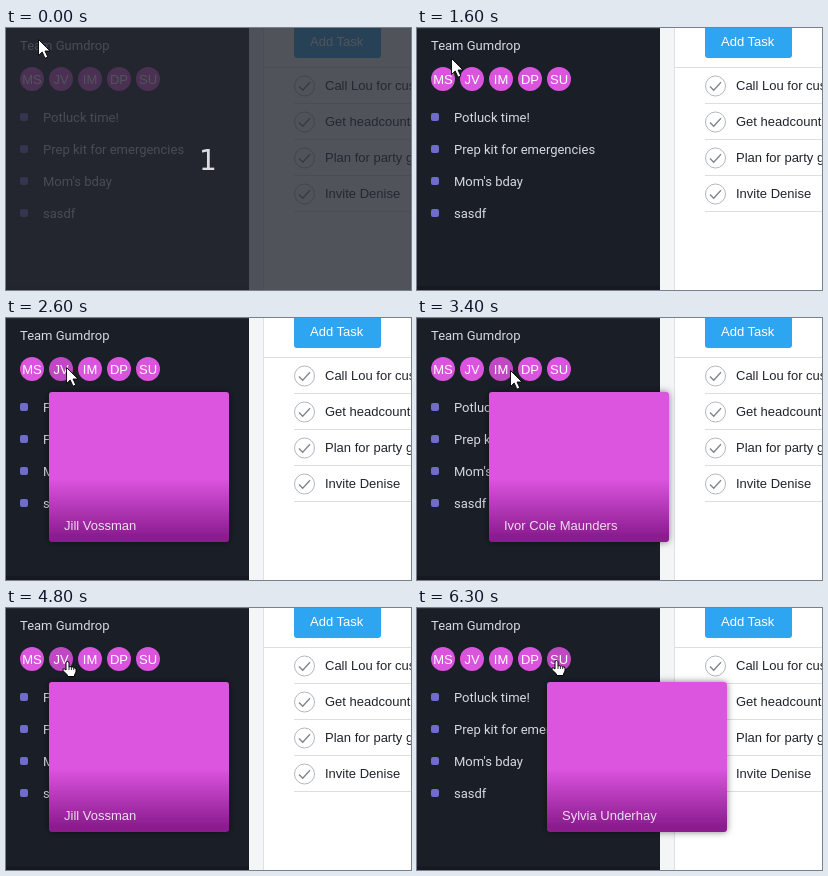
Write an HTML page that moves like this. It is 405 px wide and 262 px high and loops after 6.7 s.

```html
<!DOCTYPE html>
<html lang="en">
<head>
<meta charset="utf-8">
<title>Team avatars</title>
<style>
  html, body { margin: 0; width: 100%; height: 100%; overflow: hidden; }
  svg { display: block; width: 405px; height: 262px; cursor: default; }
  text { font: 13px "Liberation Sans", Arial, sans-serif; white-space: pre; }
  .side text { font-family: Roboto, sans-serif; fill: #d6d9dd; }
  .avatar text { fill: #fff; text-anchor: middle; }
  .tasks text { fill: #20242b; }
  .pointer { fill: #fff; stroke: #000; stroke-linejoin: round; }
</style>
</head>
<body>
<svg viewBox="0 0 405 262">
  <defs>
    <linearGradient id="shade" x1="0" y1="0" x2="0" y2="1">
      <stop offset=".58" stop-color="#db54de"/>
      <stop offset=".97" stop-color="#8a1b8e"/>
    </linearGradient>
    <filter id="shadow" x="-15%" y="-15%" width="130%" height="130%">
      <feDropShadow dx="0" dy="0" stdDeviation="3.5" flood-color="#000" flood-opacity=".5"/>
    </filter>
  </defs>

  <rect width="405" height="262" fill="#fff"/>
  <rect x="243" width="14" height="262" fill="#f4f5f6"/>
  <rect x="257" width="1" height="262" fill="#dfe2e5"/>
  <g class="tasks" id="tasks">
    <rect x="258" y="39" width="147" height="1" fill="#dcdfe2"/>
    <rect x="288" y="-10" width="87" height="40" rx="3" fill="#2ea5f0"/>
    <text x="304" y="18" style="fill:#fff">Add Task</text>
  </g>

  <rect width="243" height="262" fill="#1a1e27"/>
  <rect width="243" height="1" fill="#2b2f38"/>
  <rect y="258" width="243" height="4" fill="#171922"/>
  <g class="side" id="side"><text x="14" y="22">Team Gumdrop</text></g>
  <g id="avatars"></g>

  <g id="card">
    <rect y="74" width="180" height="150" rx="3" fill="url(#shade)" filter="url(#shadow)"/>
    <text id="cardName" x="15" y="212" fill="#f1dcf2"></text>
  </g>

  <g id="countdown">
    <rect width="405" height="262" fill="#262931" fill-opacity=".8"/>
    <text x="202" y="142" text-anchor="middle" fill="#dcdde0"
      style="font:28px 'DejaVu Sans',sans-serif">1</text>
  </g>

  <path id="arrow" class="pointer" stroke-width=".9"
    d="M.5.5V16.5L4.2 13 7 19.2 9.8 18 7 12H12Z"/>
  <g id="hand" class="pointer">
    <path d="M4 9V2Q4 .5 5.5 .5T7 2V6Q8.2 5 9.4 6.3 10.6 5.5 11.7 6.8 14 6.2 14 8.5V11L12.5 14V15.5H5.5V14L1 9.7Q.3 7.6 2.2 7.8Z"/>
    <path d="M7 6V9M9.4 6.5V9M11.7 7V9" fill="none" stroke-width=".8"/>
  </g>
</svg>
<script>
const LOOP = 6700;
const STEP = 100;
const AVATAR_GAP = 29;
const $ = id => document.getElementById(id);

function add(parent, tag, attrs, content = '') {
  const node = document.createElementNS('http://www.w3.org/2000/svg', tag);
  for (const key in attrs) node.setAttribute(key, attrs[key]);
  node.textContent = content;
  return parent.appendChild(node);
}

const members = [
  ['MS', 'Mabel Sutter'],
  ['JV', 'Jill Vossman'],
  ['IM', 'Ivor Cole Maunders'],
  ['DP', 'Delia Pockle'],
  ['SU', 'Sylvia Underhay'],
];

const circles = members.map(([initials], i) => {
  const group = add($('avatars'), 'g', { class: 'avatar' });
  const cx = 26 + i * AVATAR_GAP;
  const circle = add(group, 'circle', { cx, cy: 51, r: 12 });
  add(group, 'text', { x: cx, y: 56 }, initials);
  return circle;
});

['Potluck time!', 'Prep kit for emergencies', "Mom's bday", 'sasdf'].forEach((label, i) => {
  const y = 85 + i * 32;
  add($('side'), 'rect', { x: 14, y, width: 8, height: 8, rx: 2, fill: '#6f6ccb' });
  add($('side'), 'text', { x: 37, y: y + 9 }, label);
});

['Call Lou for customers', 'Get headcount', 'Plan for party games', 'Invite Denise'].forEach((label, i) => {
  const y = 58 + i * 36;
  const tasks = $('tasks');
  add(tasks, 'circle', { cx: 298.5, cy: y, r: 10, fill: '#fff', stroke: '#b3b8be' });
  add(tasks, 'path', { d: `M293 ${y + .5}l3.7 3.7 7.3-8`, fill: 'none', stroke: '#7d848d', 'stroke-width': 1.3 });
  add(tasks, 'text', { x: 319, y: y + 4 }, label);
  add(tasks, 'rect', { x: 288, y: y + 17, width: 117, height: 1, fill: '#dcdfe2' });
});

// Pointer poses: start time, left, top, shape, hovered member (-1 for none)
const poses = [
  [0, 32, 11, 'arrow', -1],
  [100, 9, 26, 'arrow', -1],
  [300, 5, 24, 'arrow', -1],
  [600, 1, 25, 'arrow', -1],
  [700, 10, 22, 'arrow', -1],
  [800, 25, 20, 'arrow', -1],
  [900, 37, 22, 'arrow', -1],
  [1600, 34, 30, 'arrow', -1],
  [1700, 26, 45, 'arrow', 0],
  [1800, 20, 50, 'hand', 0],
  [2200, 44, 51, 'arrow', 1],
  [2300, 46, 51, 'hand', 1],
  [2600, 60, 49, 'arrow', 1],
  [2700, 73, 50, 'arrow', 2],
  [2800, 76, 51, 'hand', 2],
  [2900, 78, 51, 'hand', 2],
  [3400, 93, 52, 'arrow', 2],
  [3500, 97, 52, 'arrow', -1],
  [3900, 100, 53, 'hand', 3],
  [4000, 104, 53, 'hand', 3],
  [4100, 101, 52, 'hand', 3],
  [4400, 109, 52, 'hand', 3],
  [4700, 82, 53, 'hand', 2],
  [4800, 56, 53, 'hand', 1],
  [4900, 100, 53, 'hand', 3],
  [5000, 127, 54, 'hand', 4],
  [5100, 131, 53, 'hand', 4],
  [5200, 133, 52, 'hand', 4],
  [5700, 139, 52, 'hand', 4],
  [6300, 134, 52, 'hand', 4],
];

function show(id, visible) {
  $(id).setAttribute('visibility', visible ? 'visible' : 'hidden');
}

function render(ms) {
  const [, x, y, shape, hovered] = poses.findLast(pose => pose[0] <= ms);
  for (const id of ['arrow', 'hand']) show(id, id === shape);
  $(shape).setAttribute('transform', `translate(${x} ${y})`);

  circles.forEach((circle, i) => circle.setAttribute('fill', i === hovered ? '#c049c3' : '#db54de'));
  show('card', hovered >= 0);
  if (hovered >= 0) {
    $('card').setAttribute('transform', `translate(${14 + hovered * AVATAR_GAP} 0)`);
    $('cardName').textContent = members[hovered][1];
  }
  show('countdown', ms < STEP);
}

const start = performance.now();
function tick() {
  render((performance.now() - start) % LOOP);
  requestAnimationFrame(tick);
}
tick();
</script>
</body>
</html>
```
